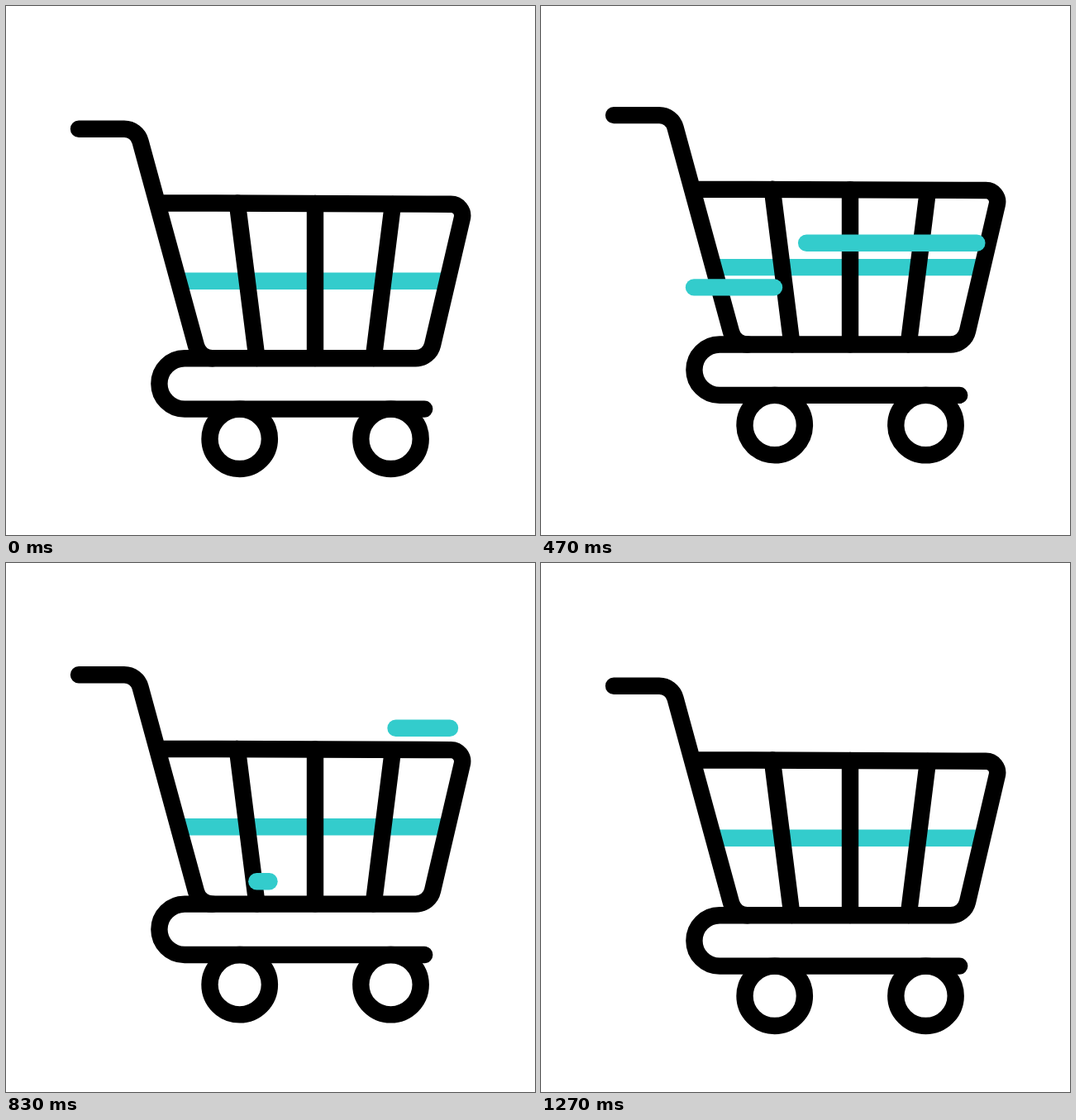
An HTML page for the animation above (1.67 s loop, 640x640 px).

```html
<!DOCTYPE html>
<html lang="en">
<head>
<meta charset="utf-8">
<title>Shopping cart</title>
<style>
  html, body { margin: 0; width: 100%; height: 100%; overflow: hidden; background: #fff; }
  svg { display: block; width: 100%; height: 100%; }
  g, .streak { fill: none; stroke: #000; stroke-width: 20.4; stroke-linecap: round; stroke-linejoin: round; }
  .streak, .band { stroke: #3cc; }
  .band { stroke-linecap: butt; }
</style>
</head>
<body>
<svg viewBox="0 0 640 640">
  <g id="cart">
    <path class="band" d="M210 332.8H532"/>
    <path d="M88 148.8H143a20.2 20.2 0 0 1 19.5 14.9L230 411a20.3 20.3 0 0 0 19.6 15.2H495.6a21 21 0 0 0 20.5-16.4L551.8 256.9a14 14 0 0 0-13.6-17.2L187 238.3"/>
    <path d="M279.8 238.5L303.5 426M374 239V426M468 240L444.7 426"/>
    <path d="M250 426.2H216.1a30.7 30.7 0 0 0 0 61.4H506.2"/>
    <circle cx="282.7" cy="523.8" r="36.2"/>
    <circle cx="465.5" cy="523.8" r="36.2"/>
  </g>
</svg>
<script>
const LOOP = 1670, FRAME = 33.4;
const HOP_START = 8, HOP = 10, RISE = 4, HOPS = 3, HEIGHT = 21.5;
const svg = document.querySelector('svg');
const cart = document.getElementById('cart');

// y, right end, left end, first frame
const streaks = [
  [286.7, 540, 311.3, 7],
  [340.4, 282, 88, 10],
  [385.2, 380, 303.3, 14],
  [199.8, 537, 459.4, 19]
].map(([y, from, to, start]) => {
  const path = document.createElementNS('http://www.w3.org/2000/svg', 'path');
  path.setAttribute('class', 'streak');
  svg.append(path);
  return { path, y, from, to, start };
});

const ease = (time, start, length) => {
  const u = Math.min(1, Math.max(0, (time - start) / length));
  return u * u * (3 - 2 * u);
};
const cubic = (u, a, b, c) => u * (a + u * (b + u * c));

// Quick rise, then a fall that speeds up until landing
function lift(time) {
  const t = time - HOP_START;
  if (t < 0 || t >= HOP * HOPS) return 0;
  const p = t % HOP;
  return HEIGHT * (p < RISE
    ? cubic(p / RISE, .904, .608, -.512)
    : 1 - cubic((p - RISE) / (HOP - RISE), .57, .23, .2));
}

function draw(now) {
  const time = Math.floor((now % LOOP + 6) / FRAME);
  cart.setAttribute('transform', `translate(0 ${-lift(time)})`);
  for (const { path, y, from, to, start } of streaks) {
    const head = ease(time, start, 8);
    const tail = ease(time, start + 6, 7);
    const x = part => from + (to - from) * part;
    path.setAttribute('d', head > tail ? `M${x(tail)} ${y}H${x(head)}` : '');
  }
}

const begin = performance.now();
function tick() {
  draw(performance.now() - begin);
  requestAnimationFrame(tick);
}
tick();
</script>
</body>
</html>
```
